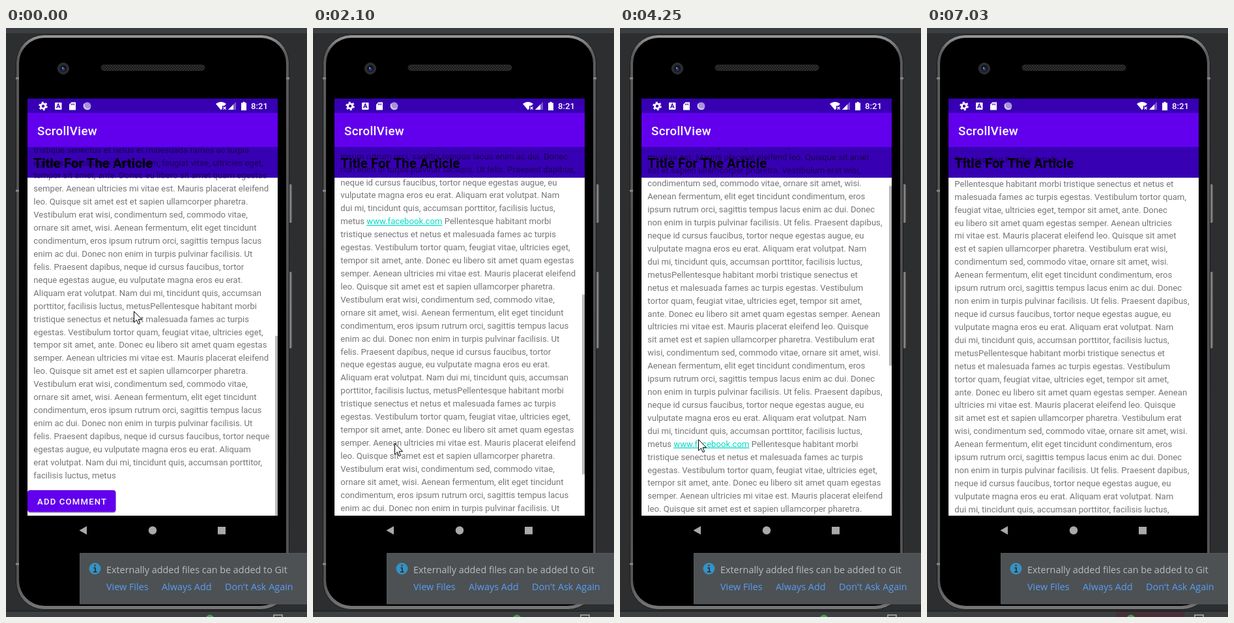
Animation of 462 by 901 pixels, one loop 7580 ms. Source, as an HTML page:

```html
<!DOCTYPE html>
<html lang="en">
<head>
<meta charset="utf-8">
<title>ScrollView</title>
<style>
  html, body { margin: 0; width: 100%; height: 100%; overflow: hidden; background: #2c2e30; }
  svg { display: block; width: 462px; height: 901px; }
  text { font: 13.13px Roboto, sans-serif; white-space: pre; }
  .medium { font-weight: 500; fill: #fff; }
  .ide text { font: 14.4px "Open Sans", sans-serif; fill: #bbb; }
  .ide .link { fill: #589df6; }
  #article { fill: #000; fill-opacity: .54; }
  #article a { fill: #03dac5; fill-opacity: 1; text-decoration: underline .8px; }
</style>
</head>
<body>
<svg viewBox="0 0 462 901">
  <defs>
    <clipPath id="view"><path d="M33 183H417V746H33Z"/></clipPath>
    <linearGradient id="rim" x2="0" y2="1">
      <stop stop-color="#9a9a9a"/><stop offset=".03" stop-color="#5c5c5c"/>
      <stop offset=".5" stop-color="#4c4c4c"/><stop offset=".95" stop-color="#555"/><stop offset="1" stop-color="#777"/>
    </linearGradient>
    <linearGradient id="key"><stop stop-color="#444"/><stop offset=".6" stop-color="#888"/><stop offset="1" stop-color="#555"/></linearGradient>
    <pattern id="mesh" width="4" height="4" patternUnits="userSpaceOnUse">
      <path d="M0 0H4V4H0Z" fill="#171717"/><path d="M0 0L4 4M4 0L0 4" stroke="#383838" stroke-width=".8"/>
    </pattern>
  </defs>

  <!-- IDE backdrop -->
  <path d="M0 0H462V8H0Z" fill="#3c3f41"/>
  <path d="M0 891H462V893H0Z" fill="#242627"/>
  <path d="M0 893H462V901H0Z" fill="#3c3f41"/>
  <path id="hover" d="M290 893H395V901H290Z" fill="#46303a"/>
  <circle cx="313" cy="904" r="6.5" fill="#499c54"/>
  <path d="M411 901V898H424V901" fill="none" stroke="#afb1b3" stroke-width="1.5"/>

  <!-- phone -->
  <path d="M433 239H437Q439 239 439 241V296Q439 298 437 298H433ZM433 373H437Q439 373 439 375V488Q439 490 437 490H433Z" fill="url(#key)"/>
  <rect x="15.5" y="10.500" width="419" height="879" rx="43" fill="url(#rim)" stroke="#1a1a1a"/>
  <path d="M15 77H20M15 249H20M430 77H435M430 820H435M15 820H20" stroke="#888" stroke-width="3"/>
  <rect x="20" y="15" width="410" height="869" rx="39" fill="#000"/>
  <rect x="146" y="56.500" width="159" height="8.500" rx="4.200" fill="url(#mesh)" stroke="#2c2c2c"/>
  <circle cx="88" cy="62" r="8.500" fill="#2b2b2d" stroke="#363636"/>
  <circle cx="88" cy="62" r="5" fill="#10131f"/>
  <circle cx="88" cy="63" r="2.500" fill="#24407e"/>
  <circle cx="87" cy="61" r="1" fill="#a9c2f0"/>

  <!-- status bar and toolbar -->
  <path d="M33 183H417V746H33Z" fill="#fff"/>
  <path d="M33 108H417V130H33ZM33 182H417V229H33Z" fill="#3700b3"/>
  <path d="M33 130H417V182H33Z" fill="#6200ee"/>
  <g fill="#fff">
    <circle cx="57" cy="119.500" r="3.600" fill="none" stroke="#fff" stroke-width="2.800"/>
    <circle cx="57" cy="119.500" r="5.800" fill="none" stroke="#fff" stroke-width="2" stroke-dasharray="3 3.074"/>
    <rect x="75" y="114" width="10.500" height="11" rx="1"/>
    <path d="M77.500 122.500L80.200 116L83 122.500M78.500 120.500H82" fill="none" stroke="#3700b3" stroke-width="1.300"/>
    <path d="M100.500 113.500H107V125.500H97V117Z"/>
    <path d="M100.500 115.500V118M102.500 115.500V118M104.500 115.500V118" stroke="#3700b3"/>
    <circle cx="124.500" cy="119.500" r="6" fill="#a892da"/>
    <path d="M120 116A6 6 0 0 0 129 123" fill="none" stroke="#e8e0f6" stroke-width="1.300"/>
    <path d="M322 116Q330 110 338 116L335 119H332V123L330 125.500Z"/>
    <path d="M333.500 120.500L337.500 124.500M337.500 120.500L333.500 124.500" stroke="#fff" stroke-width="1.300"/>
    <path d="M341 125H353V113Z" opacity=".35"/><path d="M341 125H349V117Z"/>
    <path d="M361 114.500H363.500V113H366.500V114.500H369V126H361Z"/>
  </g>
  <text class="medium" x="376" y="124">8:21</text>
  <text class="medium" x="48" y="163.800" style="font-size:18.700px;letter-spacing:.02em">ScrollView</text>

  <!-- scrolling page -->
  <text x="42.300" y="214" style="font-size:20.500px;font-weight:700">Title For The Article</text>
  <g clip-path="url(#view)">
    <g id="page">
      <g id="article"></g>
      <rect x="33.500" y="1299" width="135" height="33" rx="4" fill="#000" opacity=".25"/>
      <rect x="33" y="1297" width="135.500" height="33.500" rx="4" fill="#6200ee"/>
      <text class="medium" x="48" y="1318.500" style="letter-spacing:.0893em">ADD COMMENT</text>
    </g>
    <path id="glow" d="M30 747Q225 714 415 747Z" fill="#6200ee"/>
    <rect id="bar" x="413" width="4" height="275"/>
  </g>

  <!-- navigation keys -->
  <g fill="#a9a9a9">
    <path d="M112.500 768.500L124 762V775Z"/><circle cx="225" cy="768.500" r="6.200"/><path d="M325 763H337V774.500H325Z"/>
  </g>

  <!-- notification -->
  <g class="ide">
    <path d="M113.500 803.500H463V881H113.500Z" fill="#4d5153" stroke="#55595b"/>
    <circle cx="136.500" cy="827" r="9" fill="#3592c4"/>
    <path d="M136.500 821V823.500M134.500 826H137V832M134 832H139.500" fill="none" stroke="#34393c" stroke-width="2"/>
    <text x="154" y="834">Externally added files can be added to Git</text>
    <text class="link" x="154" y="860">View Files</text>
    <text class="link" x="239" y="860">Always Add</text>
    <text class="link" x="336" y="860">Don't Ask Again</text>
  </g>

  <path id="cursor" d="M0 0V17L4 13.200L6.600 19.500L9.200 18.400L6.600 12.300H12Z" fill="#fff" stroke="#000"/>
</svg>
<script>
const $ = id => document.getElementById(id);

const middle = `Aenean fermentum, elit eget tincidunt condimentum, eros
ipsum rutrum orci, sagittis tempus lacus enim ac dui. Donec
non enim in turpis pulvinar facilisis. Ut felis. Praesent dapibus,
neque id cursus faucibus, tortor neque egestas augue, eu
vulputate magna eros eu erat. Aliquam erat volutpat. Nam
dui mi, tincidunt quis, accumsan porttitor, facilisis luctus,`;
const repeat = `tristique senectus et netus et malesuada fames ac turpis
egestas. Vestibulum tortor quam, feugiat vitae, ultricies eget,
tempor sit amet, ante. Donec eu libero sit amet quam egestas
semper. Aenean ultricies mi vitae est. Mauris placerat eleifend
leo. Quisque sit amet est et sapien ullamcorper pharetra.
Vestibulum erat wisi, condimentum sed, commodo vitae,
ornare sit amet, wisi. Aenean fermentum, elit eget tincidunt
condimentum, eros ipsum rutrum orci, sagittis tempus lacus
enim ac dui. Donec non enim in turpis pulvinar facilisis. Ut`;
const article = `Pellentesque habitant morbi tristique senectus et netus et
malesuada fames ac turpis egestas. Vestibulum tortor quam,
feugiat vitae, ultricies eget, tempor sit amet, ante. Donec
eu libero sit amet quam egestas semper. Aenean ultricies
mi vitae est. Mauris placerat eleifend leo. Quisque sit amet
est et sapien ullamcorper pharetra. Vestibulum erat wisi,
condimentum sed, commodo vitae, ornare sit amet, wisi.
${middle}
metusPellentesque habitant morbi tristique senectus et
netus et malesuada fames ac turpis egestas. Vestibulum
tortor quam, feugiat vitae, ultricies eget, tempor sit amet,
ante. Donec eu libero sit amet quam egestas semper. Aenean
ultricies mi vitae est. Mauris placerat eleifend leo. Quisque
sit amet est et sapien ullamcorper pharetra. Vestibulum erat
wisi, condimentum sed, commodo vitae, ornare sit amet, wisi.
${middle}
metus <a>www.facebook.com</a> Pellentesque habitant morbi
${repeat}
felis. Praesent dapibus, neque id cursus faucibus, tortor
neque egestas augue, eu vulputate magna eros eu erat.
Aliquam erat volutpat. Nam dui mi, tincidunt quis, accumsan
porttitor, facilisis luctus, metusPellentesque habitant morbi
${repeat}
felis. Praesent dapibus, neque id cursus faucibus, tortor neque
egestas augue, eu vulputate magna eros eu erat. Aliquam
erat volutpat. Nam dui mi, tincidunt quis, accumsan porttitor,
facilisis luctus, metus`;

const line = (text, y) => `<text x="42.3" y="${y}">${text}</text>`;
$('article').innerHTML = line('Sub Heading For the Article', 206) +
  article.split('\n').map((text, i) => line(text, 242.8 + i * 19.92)).join('');

// The picture only changes at these moments.
const steps = [0, 120, 260, 410, 560, 730, 900, 1040, 1190, 1320, 1450, 1580,
  1950, 2100, 2260, 2420, 2580, 2750, 2920, 3040, 3190, 3350, 3510, 3660, 3820, 3980,
  4100, 4250, 4370, 4500, 4630, 4750, 4880, 5010, 5140, 5290, 5410, 5540, 5660, 5790,
  6080, 6220, 6350, 6490, 6620, 6760, 6890, 7030];

// time, cursor x, cursor y, scroll offset
const keys = [
  [0, 196, 433, 590], [730, 196, 362, 590], [900, 195, 369, 582.3],
  [1580, 190, 490, 462], [2100, 125, 635, 460.4], [2420, 130, 393, 460.4],
  [3190, 118, 603, 250], [3660, 122, 499, 250], [4250, 120, 629, 120],
  [4500, 238, 266, 120], [4630, 234, 359, 27], [4750, 232, 386, 0],
  [5140, 190, 556, 0], [5790, 43, 205, 0], [6080, 60, 230, 0],
  [6760, 429, 760, 0], [7030, 350, 906, 0]];

const ramp = (t, from, to) => Math.min(1, Math.max(0, (t - from) / (to - from)));

function pose(t) {
  const i = Math.max(1, keys.findIndex(k => k[0] >= t));
  const a = keys[i - 1], b = keys[i], u = ramp(t, a[0], b[0]);
  return a.map((v, j) => v + (b[j] - v) * u);
}

const start = performance.now();
function draw() {
  const now = (performance.now() - start) % 7580;
  const t = steps.findLast(s => s <= now) ?? 0;
  const [, x, y, scroll] = pose(t);
  $('cursor').setAttribute('transform', `translate(${x + .5} ${y + .5})`);
  $('page').setAttribute('transform', `translate(0 ${-scroll})`);
  $('bar').setAttribute('y', 183 + scroll * .488);
  $('bar').setAttribute('opacity', .27 * (1 - ramp(t, 5290, 5790)));
  $('glow').setAttribute('opacity', .09 * ramp(t, 120, 560) * (1 - ramp(t, 900, 1190)));
  $('hover').setAttribute('opacity', +(t >= 7030));
  requestAnimationFrame(draw);
}
draw();
</script>
</body>
</html>
```
